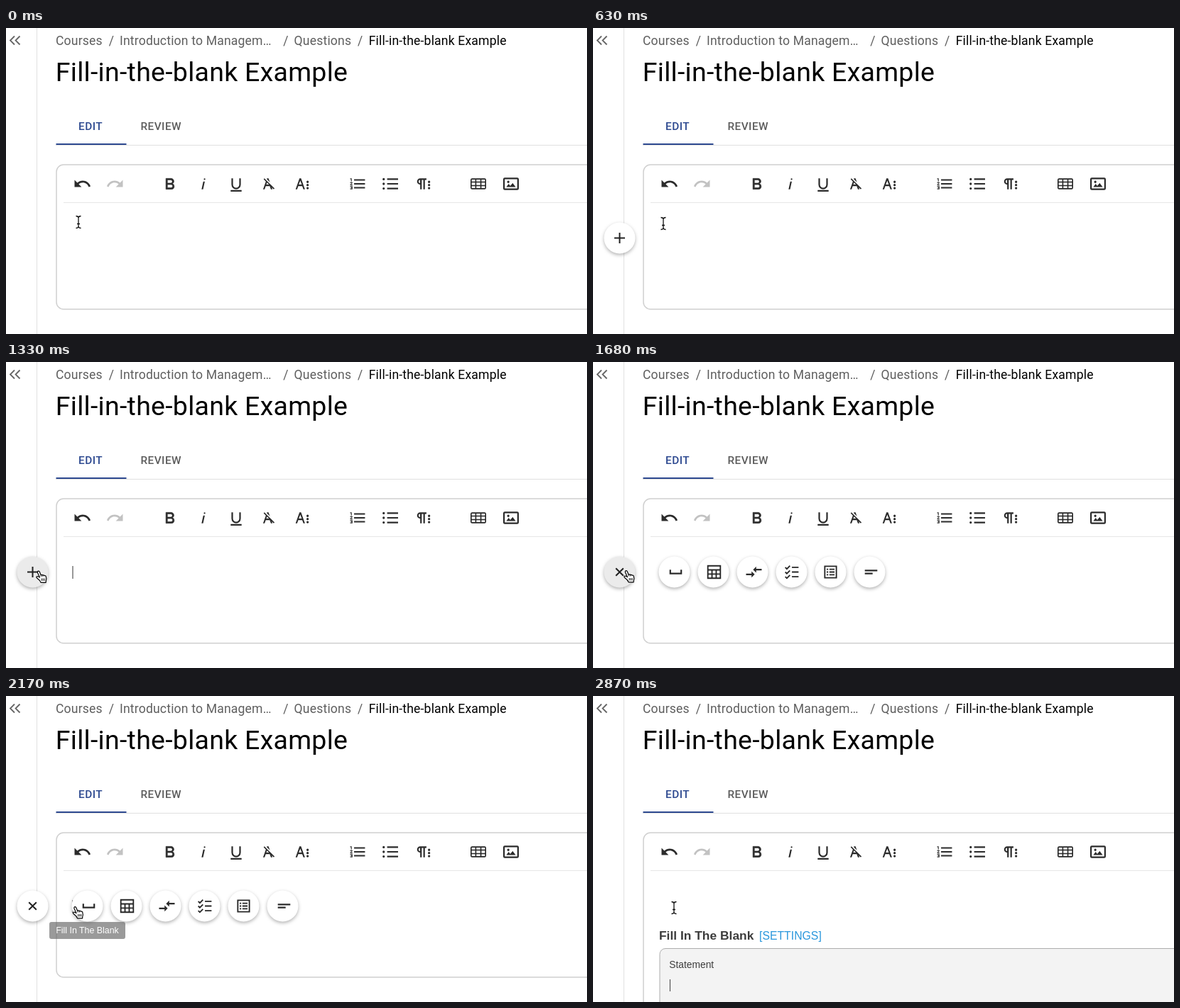
These frames come from a looping animation (818 by 432 pixels, 2940 ms). An HTML page:

```html
<!DOCTYPE html>
<html lang="en">
<head>
<meta charset="utf-8">
<title>Question editor</title>
<style>
  html, body { margin: 0; width: 100%; height: 100%; overflow: hidden; background: #fff; }
  svg { display: block; }
  text { font-family: Roboto, sans-serif; white-space: pre; }
  .crumbs { font-size: 17.6px; letter-spacing: .165px; fill: #5f5f5f; }
  .title { font-size: 37.5px; letter-spacing: .27px; }
  .tab { font-size: 15.4px; font-weight: 500; letter-spacing: .44px; fill: #5c5c5c; }
  .arial, .tip text { font-family: "Liberation Sans", Arial, sans-serif; }
  .tip text { font-size: 12.4px; fill: #fff; text-anchor: middle; }
  .tip rect { fill: #616161; }
  .line { fill: none; stroke: #e0e0e0; }
  .stroke { fill: none; stroke: #262626; stroke-width: 1.7; }
  .icon { fill: #2b2b2b; }
  .disc { filter: drop-shadow(0 2px 2.5px rgba(0, 0, 0, .3)); }
  .caret { stroke: #555; stroke-width: 1.2; }
</style>
</head>
<body>
<svg id="stage" width="818" height="432" viewBox="0 0 818 432">
  <path class="line" d="M43.5 0V432M70 165.5H818"/>
  <path d="M12 11.5L6 17.5L12 23.5M19.5 11.5L13.5 17.5L19.5 23.5" fill="none" stroke="#666" stroke-width="1.8"/>
  <g class="crumbs">
    <text x="70" y="23.8">Courses</text>
    <text x="144.8" y="23.8">/</text>
    <text x="160" y="23.8">Introduction to Managem…</text>
    <text x="390.3" y="23.8">/</text>
    <text x="405.6" y="23.8">Questions</text>
    <text x="495" y="23.8">/</text>
    <text x="510.7" y="23.8" fill="#000">Fill-in-the-blank Example</text>
  </g>
  <text class="title" x="69.8" y="75">Fill-in-the-blank Example</text>
  <text class="tab" x="102" y="144" style="fill:#2d4990">EDIT</text>
  <text class="tab" x="189.5" y="144">REVIEW</text>
  <rect x="70.5" y="163" width="99" height="2" fill="#2d4990"/>
  <rect id="editor" x="71" y="193" width="800" height="204" rx="10" fill="none" stroke="#d0d0d0" stroke-width="1.5"/>
  <path class="line" d="M81 246.5H818" style="stroke:#e6e6e6"/>
  <g id="toolbar" class="icon"></g>
  <path id="caret" class="caret" d="M94 288V306"/>
  <g id="block">
    <text class="arial" x="93" y="344" font-size="17.4" font-weight="700" fill="#3c3c3c">Fill In The Blank</text>
    <text class="arial" x="234" y="344" font-size="15.8" fill="#2a97dc">[SETTINGS]</text>
    <rect x="94" y="356.5" width="800" height="200" rx="8" fill="#f3f3f3" stroke="#adadad"/>
    <text class="arial" x="107.3" y="384" font-size="13.8" fill="#3c3c3c">Statement</text>
    <path class="caret" d="M108.5 400V417"/>
  </g>
  <g id="fabs"></g>
  <g id="addTip" class="tip"><rect x=".5" y="319" width="74" height="24" rx="3"/><text x="37.5" y="335">Add Block</text></g>
  <g id="blankTip" class="tip"><rect x="61" y="319" width="107" height="24" rx="3"/><text x="114.5" y="335">Fill In The Blank</text></g>
  <circle id="ring" fill="none" stroke="#000" stroke-width="1.5"/>
  <g id="beam" fill="none">
    <path id="beamShape" stroke="#fff" stroke-width="3" d="M-3.5-8.5Q-.5-8.5 0-6.5Q.5-8.5 3.5-8.5M0-7V7M-3.5 8.5Q-.5 8.5 0 6.5Q.5 8.5 3.5 8.5M-2 2.5H2"/>
    <use href="#beamShape"/>
  </g>
  <g id="hand" stroke="#000" stroke-width="1.2" stroke-linejoin="round">
    <path fill="#fff" d="M2 8.6L-1 2Q-1.6 0 .2-.3Q1.4-.4 2 1.2L3.6 5.2Q5.4 4.2 6.1 5.6Q7.8 4.8 8.6 6.2Q10.3 5.6 10.8 7.4Q11.8 11 10.8 13.2L10.6 15.8H3.6Q2.8 13-1 10.2Q-3.6 8.2-2 7.2Q-.6 6.6 2 8.6Z"/>
    <path fill="none" stroke-width=".9" d="M4.7 10V13.4M6.7 10V13.4M8.7 10V13.4M3.6 5.2L4.2 7.5M6.1 5.6L6.4 7.5"/>
  </g>
</svg>
<script>
const LOOP = 2940, STEP = 70;
const el = id => document.getElementById(id);
const clamp = v => Math.max(0, Math.min(1, v));
const ramp = (t, start, length) => clamp((t - start) / length);
const easeOut = k => 1 - (1 - k) ** 3;
const show = (id, on) => el(id).style.display = on ? '' : 'none';

// Icons are drawn in a 24 x 24 box around their centre.
const icon = (x, y, d, attrs = '') =>
  `<g transform="translate(${x} ${y}) scale(1.1)"><path transform="translate(-12 -12)" d="${d}" ${attrs}/></g>`;
const dot = (x, y, r = 1.5) => `M${x - r} ${y}a${r} ${r} 0 1 0 ${2 * r} 0a${r} ${r} 0 1 0 ${-2 * r} 0Z`;
const more = dot(18.95, 9.5) + dot(18.95, 13.5) + dot(18.95, 17.5);
const stroked = 'class="stroke"';
const undo = 'M12.5 8c-2.65 0-5.05.99-6.9 2.6L2 7v9h9l-3.62-3.62c1.39-1.16 3.16-1.88 5.12-1.88 3.54 0 6.55 2.31 7.6 5.5l2.37-.78C21.08 11.03 17.15 8 12.5 8z';

el('toolbar').innerHTML = [
  [107.5, undo],
  [231, 'M15.25 11.8A3.68 3.68 0 0 0 17 9a3.93 3.93 0 0 0-3.86-4H6.65V19h7a3.74 3.74 0 0 0 3.7-3.78V15.1A3.64 3.64 0 0 0 15.25 11.8ZM8.65 7h4.2a2 2 0 0 1 0 4H8.65Zm4.6 10H8.65V13h4.6a2 2 0 0 1 0 4Z', 'stroke="#2b2b2b" stroke-width=".5"'],
  [278, 'M11.76 9h2l-2.2 10h-2Zm1.68-4a1 1 0 1 0 1 1 1 1 0 0 0-1-1Z'],
  [324, 'M19 20v2H5V20ZM16 13a4 4 0 0 1-8 0V5H6v8a6 6 0 0 0 12 0V5H16Z'],
  [370, 'M11.48 10.09L6.43 5 5.37 6.1 8.25 9 4.66 19h2l1.43-4h5.14l1.43 4h2l-.89-2.52L18.27 19l1.07-1.06L14.59 13.2ZM8.8 13l.92-2.56L12.27 13Zm.56-7.15L9.66 5h2l1.75 4.9Z'],
  [417, 'M13.55 19h2l-5-14h-2l-5 14h2l1.4-4h5.1Zm-5.9-6 1.9-5.2 1.9 5.2Z' + more],
  [495, 'M2.5 16h2v.5h-1v1h1V18h-2v1h3V15h-3Zm1-7h1V5h-2V6h1Zm-1 2H4.3L2.5 13.1V14h3V13H3.7l1.8-2.1V10h-3Zm5-5V8h14V6Zm0 12h14V16H7.5Zm0-5h14V11H7.5Z'],
  [541, dot(3.6, 6) + dot(3.6, 12) + dot(3.6, 18) + 'M8 5V7H22V5ZM8 11V13H22V11ZM8 17V19H22V17Z'],
  [588, 'M7.6 5a4 4 0 0 0 0 8v6h2V7h2V19h2V7h2V5ZM5.5 9a2 2 0 0 1 2-2v4A2 2 0 0 1 5.5 9Z' + more],
  [665, 'M4 5.75H20Q21.25 5.75 21.25 7V17Q21.25 18.25 20 18.25H4Q2.75 18.25 2.75 17V7Q2.75 5.75 4 5.75ZM2.75 9.75H21.25M2.75 14.25H21.25M8.75 5.75V18.25M15.25 5.75V18.25', 'class="stroke" style="stroke-width:1.5"'],
  [711, 'M14.2 11l3.8 5H6l3-3.9 2.1 2.7L14 11ZM22 6v12a2 2 0 0 1-2 2H4a2 2 0 0 1-2-2V6a2 2 0 0 1 2-2h16a2 2 0 0 1 2 2ZM20 6H4v12h16Z' + dot(8.5, 9.5)]
].map(([x, d, attrs]) => icon(x, 220, d, attrs)).join('') +
  `<g transform="translate(153.5 220) scale(-1 1)" fill="#c2c2c2">${icon(0, 0, undo)}</g>`;

const actions = [
  [2, 'M18 9v4H6V9H4v6h16V9z'],
  [1, 'M4 4H20V20H4ZM4 9.3H20M4 14.6H20M9.3 9.3V20M14.7 9.3V20', stroked],
  [2, 'M9 14H2v2h7v3l4-4-4-4zM15 13v-3h7V8h-7V5l-4 4z'],
  [0, [6, 12, 18].map(y => `M4 ${y}l2 2l4-4M12.5 ${y}H21`).join(''), stroked],
  [0, 'M4.6 4.6H19.4V19.4H4.6ZM7 8.5H9M7 12H9M7 15.5H9M10.5 8.5H17M10.5 12H17M10.5 15.5H17', stroked],
  [2, 'M4 9h16v2H4zM4 13h10v2H4z']
];
const fab = (id, content) =>
  `<g id="${id}"><circle class="disc" r="22" fill="#fff"/>${content}</g>`;
el('fabs').innerHTML =
  fab('add', '<path id="plus" d="M-7.5 0H7.5M0-7.5V7.5" fill="none" stroke="#222" stroke-width="2"/>') +
  actions.map(([dx, d, attrs], i) => fab('action' + i, `<g class="icon">${icon(dx, 0, d, attrs)}</g>`)).join('');

const path = [
  [0, 102, 274], [560, 102, 274], [630, 99, 276], [840, 73, 288], [980, 54, 293], [1120, 45.5, 295.5],
  [1610, 45.5, 295.5], [1680, 46.5, 295], [1820, 59, 293], [1890, 70, 292], [2170, 97, 298],
  [2310, 114, 299], [LOOP, 114, 299]
];
function pointer(t) {
  const i = path.findIndex(p => p[0] > t);
  const [a, b] = [path[i - 1], path[i]], k = ramp(t, a[0], b[0] - a[0]);
  return [a[1] + (b[1] - a[1]) * k, a[2] + (b[2] - a[2]) * k];
}

// Clicks: start time, radius
const clicks = [[70, 17], [1190, 31.5], [2520, 30.5]];

function zoom(id, x, k) {
  show(id, k > 0);
  el(id).setAttribute('transform', `translate(${x} 296.5) scale(${k})`);
}

function draw(t) {
  const leave = 1 - ramp(t, 2600, 200);
  zoom('add', 37.5, easeOut(ramp(t, 160, 230)) * leave);
  actions.forEach((_, i) => zoom('action' + i, 114.5 + 55 * i, t < 2660 ? easeOut(ramp(t, 1345 + 30 * i, 170)) : leave));
  el('plus').setAttribute('transform', `rotate(${45 * easeOut(ramp(t, 1340, 220))})`);
  const grey = 255 - 20 * (ramp(t, 910, 200) - ramp(t, 1690, 160));
  el('add').firstChild.setAttribute('fill', `rgb(${grey},${grey},${grey})`);

  const inserted = t >= 2730;
  show('block', inserted);
  el('editor').setAttribute('height', inserted ? 400 : 204);
  show('caret', t >= 70 && !inserted && (t - 40) % 1060 < 530);

  el('addTip').style.opacity = t < 1190 ? .9 * easeOut(ramp(t, 910, 210)) : 0;
  el('blankTip').style.opacity = t < 2520 ? .9 * easeOut(ramp(t, 2100, 210)) : 0;

  const [x, y] = pointer(t);
  const click = clicks.find(([start]) => t >= start && t < start + 140);
  show('ring', click);
  if (click) {
    el('ring').setAttribute('r', click[1]);
    el('ring').setAttribute('transform', `translate(${x} ${y - .5})`);
  }
  const hand = x < 60 || (x > 92 && t > 1680 && !inserted);
  show('hand', hand);
  show('beam', !hand);
  el(hand ? 'hand' : 'beam').setAttribute('transform', `translate(${x} ${y})`);
}

el('beam').lastElementChild.outerHTML =
  `<path d="${el('beamShape').getAttribute('d')}" stroke="#111" stroke-width="1.3"/>`;

const begin = performance.now();
function frame() {
  const t = (performance.now() - begin) % LOOP;
  draw(Math.floor(t / STEP) * STEP);
  requestAnimationFrame(frame);
}
frame();
</script>
</body>
</html>
```
